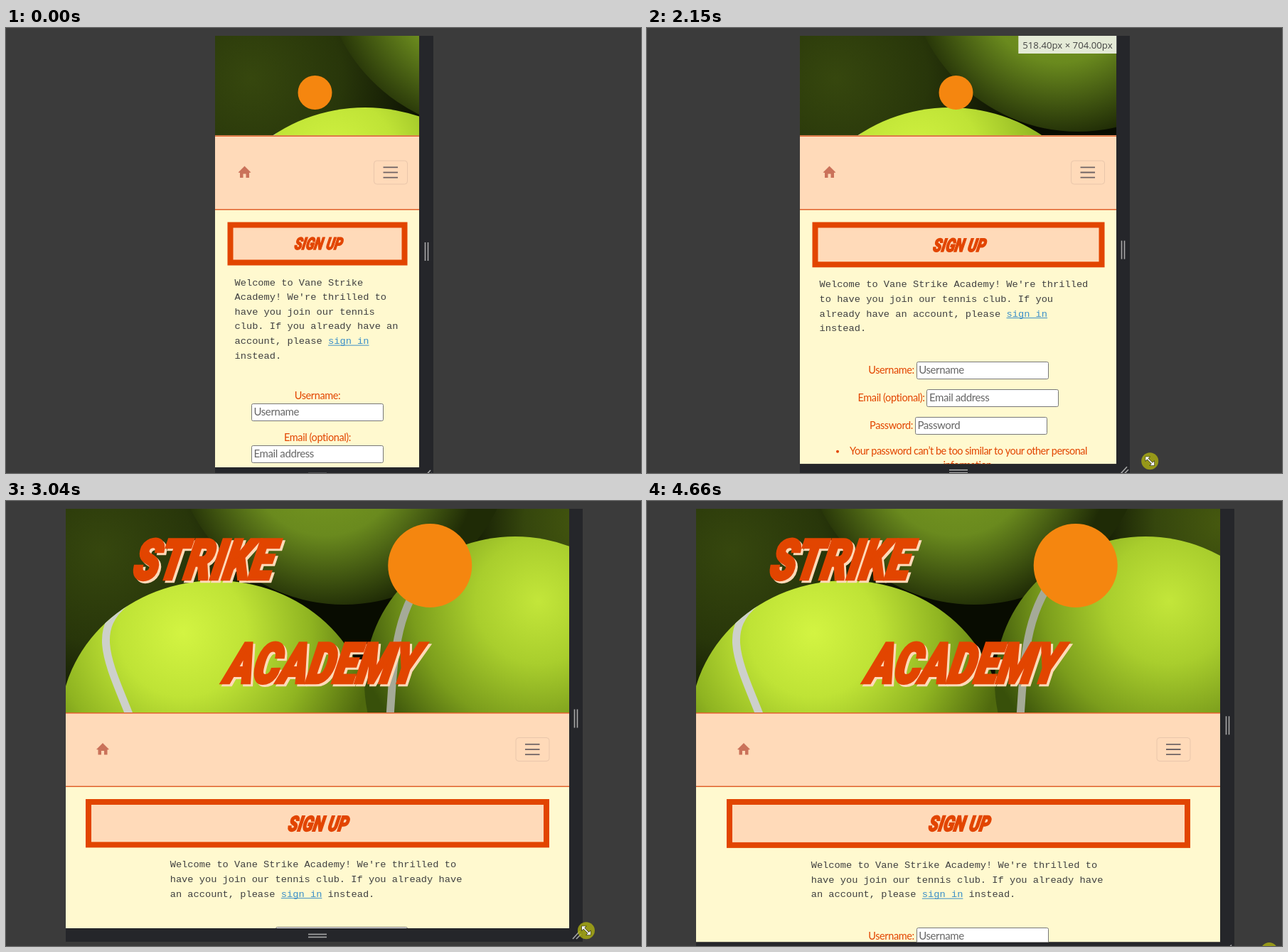
An HTML page with a canvas for the animation above (4.72 s loop, 893 by 627 pixels).

```html
<!DOCTYPE html>
<html lang="en">
<head>
<meta charset="utf-8">
<title>Responsive sign-up page</title>
<style>
  html, body { margin: 0; width: 100%; height: 100%; overflow: hidden; background: #3b3b3b; }
  canvas { display: block; width: 893px; height: 627px; }
</style>
</head>
<body>
<canvas id="stage"></canvas>
<script>
const W = 893, H = 627, LOOP = 4720, TOP = 11, MID = 438, ZOOM = 0.857;
const FIRE = '#e24500', PEACH = '#ffdab9', CREAM = '#fff9cf', BAR = '#25262a', LINK = '#3b8fc8';
const MONO = '13.7px "Liberation Mono", monospace', CHAR = 8.22, LINE = 20.65;
const LABEL = '14.5px Lato, sans-serif', FIELD = '15px Lato, sans-serif';
const SIGN_IN = 'sign\u00a0in';
const WELCOME = `Welcome to Vane Strike Academy! We're thrilled to have you join our tennis club. If you already have an account, please ${SIGN_IN} instead.`;
const FIELDS = [['Username:', 'Username'], ['Email (optional):', 'Email address'], ['Password:', 'Password']];
const RULES = [
  'Your password can’t be too similar to your other personal information.',
  'Your password must contain at least 8 characters.',
  'Your password can’t be a commonly used password.'
];

const canvas = document.getElementById('stage');
const ctx = canvas.getContext('2d');
const dpr = window.devicePixelRatio || 1;
canvas.width = W * dpr;
canvas.height = H * dpr;

// ---- Motion ----
const within = (t, a, b) => t >= a && t < b;
const ramp = (t, a, b) => Math.min(1, Math.max(0, (t - a) / (b - a)));
const slowing = p => p * (1 + 0.315 * (1 - p));

// A slow start, one long pull, a second pull, then a small step back
const pageHalf = t => 143.5 + 6.2 * ramp(t, 1220, 1820)
  + 204.3 * slowing(ramp(t, 1820, 2960))
  + 18.5 * slowing(ramp(t, 3180, 3560)) - 4 * ramp(t, 3780, 4100);

// The frame runs ahead of the page in the middle of the long pull
const frameHalf = t => pageHalf(t) + 41 * Math.sin(Math.PI * ramp(t, 2250, 2610));

const pageBottom = t => 619 - 17 * ramp(t, 1820, 3000)
  + 23 * ramp(t, 3180, 3560) - 3.5 * ramp(t, 3780, 4100);

const isDragging = t => within(t, 1220, 3640) || within(t, 3780, 4060);
const isSizing = t => within(t, 1220, 2960) || within(t, 3180, 3640) || within(t, 3780, 4100);

// Pointer stops: time, x, y
const STOPS = [
  [130, 663, 302], [640, 587, 585], [870, 586, 602], [1220, 603, 616], [1820, 628, 614],
  [2430, 774, 607], [3000, 816, 605], [3710, 815, 611], [4190, 866, 590], [4600, 875, 634]
];

function pointer(t) {
  const i = Math.max(1, STOPS.findIndex(s => s[0] > t));
  if (t >= STOPS.at(-1)[0]) return STOPS.at(-1).slice(1);
  const [a, b] = [STOPS[i - 1], STOPS[i]];
  const p = ramp(t, a[0], b[0]);
  return [1, 2].map(k => a[k] + (b[k] - a[k]) * p);
}

// ---- Drawing helpers ----
function rect(x, y, w, h, color) {
  ctx.fillStyle = color;
  ctx.fillRect(x, y, w, h);
}

function line(x1, y1, x2, y2, color, width) {
  ctx.strokeStyle = color;
  ctx.lineWidth = width;
  ctx.beginPath();
  ctx.moveTo(x1, y1);
  ctx.lineTo(x2, y2);
  ctx.stroke();
}

function oval(x, y, rx, ry, fill) {
  ctx.fillStyle = fill;
  ctx.beginPath();
  ctx.ellipse(x, y, rx, ry, 0, 0, Math.PI * 2);
  ctx.fill();
}

function roundBox(x, y, w, h, r, border, fill) {
  ctx.beginPath();
  ctx.roundRect(x, y, w, h, r);
  if (fill) {
    ctx.fillStyle = fill;
    ctx.fill();
  }
  ctx.strokeStyle = border;
  ctx.lineWidth = 1;
  ctx.stroke();
}

function shape(x, y, points) {
  ctx.beginPath();
  points.forEach(([dx, dy]) => ctx.lineTo(x + dx, y + dy));
  ctx.closePath();
}

function glow(x, y, r, ...colors) {
  const g = ctx.createRadialGradient(x, y, 0, x, y, r);
  colors.forEach((c, i) => g.addColorStop(i / (colors.length - 1), c));
  return g;
}

function setFont(font, spacing) {
  ctx.font = font;
  ctx.letterSpacing = spacing + 'px';
}

function text(str, x, y, font, color, spacing = 0, align = 'left') {
  setFont(font, spacing);
  ctx.textAlign = align;
  ctx.fillStyle = color;
  ctx.fillText(str, x, y);
}

function wrap(str, fits) {
  const lines = [''];
  for (const word of str.split(' ')) {
    const last = lines.at(-1);
    const longer = last ? last + ' ' + word : word;
    if (!last || fits(longer)) lines[lines.length - 1] = longer;
    else lines.push(word);
  }
  return lines;
}

// Heavy slanted lettering, centred on (x, y)
function display(str, x, y, size, shadow = 0) {
  const put = (dx, color) => {
    ctx.save();
    ctx.transform(0.76, 0, -0.2, 1, x + dx, y + dx);
    ctx.strokeStyle = color;
    ctx.lineWidth = size * 0.06;
    text(str, 0, size * 0.356, `italic 900 ${size}px Roboto, sans-serif`, color, 0, 'center');
    ctx.strokeText(str, 0, size * 0.356);
    ctx.restore();
  };
  if (shadow) put(shadow, PEACH);
  put(0, FIRE);
}

// ---- Page ----
function ball(x, y, rx, ry, fill, seam) {
  oval(x, y, rx, ry, fill);
  if (!seam) return;
  ctx.save();
  ctx.clip();
  ctx.strokeStyle = seam.color;
  ctx.lineWidth = 11;
  ctx.beginPath();
  ctx.moveTo(...seam.from);
  ctx.bezierCurveTo(...seam.curve);
  ctx.stroke();
  ctx.restore();
}

function photo(x, w, h) {
  ctx.save();
  ctx.beginPath();
  ctx.rect(x, TOP, w, h);
  ctx.clip();
  ctx.translate(x, TOP);
  rect(0, 0, w, h, '#080c01');
  ball(60, 60, 270, 240, glow(50, 60, 260, '#36470e', '#28360a', '#080c01'));
  ball(740, -10, 190, 190, glow(740, 20, 190, '#46590f', '#35460d', '#0c1202'));
  ball(391, -115, 243, 250, glow(365, -70, 215, '#7a9c22', '#6a8a1e', '#1f2b06'));
  ball(211, 304, 219, 203, glow(165, 175, 270, '#d3f442', '#bfe336', '#8fb421', '#4f690e'),
    { color: '#cdd0cb', from: [84, 132], curve: [34, 172, 62, 220, 90, 292] });
  ball(632, 245, 212, 206, glow(665, 130, 265, '#c3e63a', '#a9ce2d', '#7b9d1c', '#38500a'),
    { color: '#a5aa98', from: [512, 85], curve: [462, 145, 462, 210, 456, 292] });
  ctx.restore();
}

function nav(x0, x1, y) {
  ctx.fillStyle = '#ca725a';
  shape(x0 + 24, y, [[0, -9], [9, 0], [6.5, 0.5], [6.5, 7.5], [2, 7.5], [2, 2], [-2, 2], [-2, 7.5], [-6.5, 7.5], [-6.5, 0.5], [-9, 0]]);
  ctx.fill();
  roundBox(x1 - 47, y - 16.5, 47, 33, 4, '#e9c6ab');
  for (let i = -1; i <= 1; i++) line(x1 - 34, y + i * 7.2, x1 - 13.5, y + i * 7.2, '#6f6465', 1.8);
}

// Returns the y of the last line
function paragraph(x, width, y) {
  const lines = wrap(WELCOME, s => s.length * CHAR <= width);
  lines.forEach((str, i) => {
    const ly = y + i * LINE + 4.5;
    const [before, after] = str.split(SIGN_IN);
    text(before, x, ly, MONO, '#404040');
    if (after === undefined) return;
    const lx = x + before.length * CHAR, end = lx + SIGN_IN.length * CHAR;
    text(SIGN_IN, lx, ly, MONO, LINK);
    line(lx, ly + 2, end, ly + 2, LINK, 1);
    text(after, end, ly, MONO, '#404040');
  });
  return y + (lines.length - 1) * LINE;
}

function input(x, y, hint) {
  roundBox(Math.round(x) + 0.5, Math.round(y) - 11.5, 185, 24, 2, '#777', '#fff');
  text(hint, x + 3.5, y + 5.5, FIELD, '#666', -0.4);
}

function form(left, inner, lastLine) {
  let y = lastLine + 59;
  for (const [label, hint] of FIELDS) {
    setFont(LABEL, -0.4);
    const total = ctx.measureText(label).width + 189;
    if (total > inner) {
      text(label, MID, y + 3, LABEL, FIRE, -0.4, 'center');
      input(MID - 93, y + 20.5, hint);
      y += 59;
    } else {
      text(label, MID - total / 2, y + 5, LABEL, FIRE, -0.4);
      input(MID + total / 2 - 186, y, hint);
      y += 39;
    }
  }
  y -= 3;
  for (const rule of RULES) {
    setFont(LABEL, -0.5);
    oval(left + 53, y + 1, 2, 2, FIRE);
    for (const str of wrap(rule, s => ctx.measureText(s).width <= inner - 27)) {
      text(str, MID + 14, y + 5, LABEL, FIRE, -0.5, 'center');
      y += LINE;
    }
  }
}

function page(half, bottom) {
  const x = Math.floor(MID - half), w = Math.round(half * 2), css = w / ZOOM;
  const large = css >= 768;
  const head = large ? 287 : 140.5, y0 = TOP + head;
  const boxW = large ? 652 : w - 34;
  const x0 = MID - boxW / 2, x1 = MID + boxW / 2;

  ctx.save();
  ctx.beginPath();
  ctx.rect(x, TOP, w, bottom - TOP);
  ctx.clip();
  rect(x, TOP, w, bottom - TOP, CREAM);
  photo(x, w, head);
  if (large) {
    display('STRIKE', MID - w * 0.2225, 82, 78, 3);
    display('ACADEMY', MID + 9, 228, 78, 3);
    oval(MID + w * 0.2235, 91, 59, 59, '#f5860f');
  } else {
    if (css >= 576) {
      display('STRIKE', MID - boxW / 3 + 8, 53, 39, 2);
      display('ACADEMY', MID + boxW / 3 + 4, 53, 39, 2);
    }
    oval(434.5, 91, 24, 24, '#f5860f');
  }

  rect(x, y0, w, 105, PEACH);
  rect(x, y0, w, 1.5, '#e0622c');
  rect(x, y0 + 103.5, w, 1.5, '#e0622c');
  nav(x0, x1, y0 + 52);

  const grow = Math.max(0, w - 287);
  const boxH = 61 + grow * 0.0175, by = y0 + 122;
  rect(x0, by, boxW, boxH, FIRE);
  rect(x0 + 8, by + 8, boxW - 16, boxH - 16, PEACH);
  display('SIGN UP', MID + 2, by + boxH / 2, 23.5 * (1 + grow * 0.00062));

  const inner = (large ? boxW * 2 / 3 : boxW) - 20;
  const last = paragraph(MID - inner / 2, inner, by + boxH + 23.5);
  form(x, inner, last);
  ctx.restore();
}

// ---- Resizable frame ----
function frame(half, bottom, hot) {
  const l = Math.floor(MID - half), r = Math.round(MID + half);
  const color = hot ? '#4a4a4a' : BAR, grip = '#a9a9a9';
  rect(l, TOP, r - l, bottom - TOP, '#272727');
  rect(r, TOP, 19, bottom - TOP + 19, color);
  rect(l, bottom, r - l, 19, color);
  const my = (TOP + bottom) / 2;
  for (const d of [7.5, 11.5]) line(r + d, my - 13, r + d, my + 13, grip, 1.6);
  for (const d of [8.5, 12.5]) line(425, bottom + d, 451, bottom + d, grip, 1.6);
  line(r + 5, bottom + 15, r + 15, bottom + 4, grip, 1.6);
  line(r + 10, bottom + 15, r + 17, bottom + 8, grip, 1.6);
}

function sizeTag(half, bottom) {
  const r = MID + half;
  const px = v => (Math.round(v / ZOOM / 0.8) * 0.8).toFixed(2) + 'px';
  rect(r - 138, TOP, 138, 25, 'rgba(255,255,255,0.82)');
  text(`${px(half * 2)} × ${px(bottom - TOP)}`, r - 132, 28.5, '13.2px "Open Sans", sans-serif', '#444');
}

// ---- Pointer ----
function outlined() {
  ctx.strokeStyle = '#1a1a1a';
  ctx.lineWidth = 1;
  ctx.stroke();
  ctx.fillStyle = '#fff';
  ctx.fill();
}

function resizeCursor(x, y, angle) {
  const side = [[8.5, 0], [4.5, 4], [4.5, 0.8]];
  const half = [[4.5, -0.8], [4.5, -4], ...side];
  ctx.save();
  ctx.translate(x, y);
  ctx.rotate(angle);
  shape(0, 0, [...half, ...half.map(([a, b]) => [-a, -b])]);
  outlined();
  ctx.restore();
}

function arrowCursor(x, y) {
  shape(x, y, [[0, 0], [0, 16], [4, 12.5], [6.5, 18], [9, 17], [6.5, 11.5], [11.5, 11.5]]);
  outlined();
}

function cursor(t) {
  if (t < 130) return;
  const [x, y] = pointer(t);
  if (isDragging(t) || t >= 4640) oval(x, y, 12, 12, 'rgba(176,178,16,0.78)');
  if (within(t, 640, 950)) resizeCursor(x, y, 0);
  else if (within(t, 950, 4060)) resizeCursor(x, y, Math.PI / 4);
  else if (t < 4600) arrowCursor(x, y);
}

function draw(t) {
  const half = pageHalf(t), bottom = pageBottom(t);
  ctx.setTransform(dpr, 0, 0, dpr, 0, 0);
  rect(0, 0, W, H, '#3b3b3b');
  frame(frameHalf(t), bottom, within(t, 1000, 1960));
  page(half, bottom);
  if (isSizing(t)) sizeTag(half, bottom);
  // Area uncovered before the page has repainted
  if (within(t, 1780, 1890)) rect(MID + half - 9, TOP, 9, 246, CREAM);
  cursor(t);
}

function tick(now) {
  draw(now % LOOP);
  requestAnimationFrame(tick);
}
requestAnimationFrame(tick);
</script>
</body>
</html>
```
